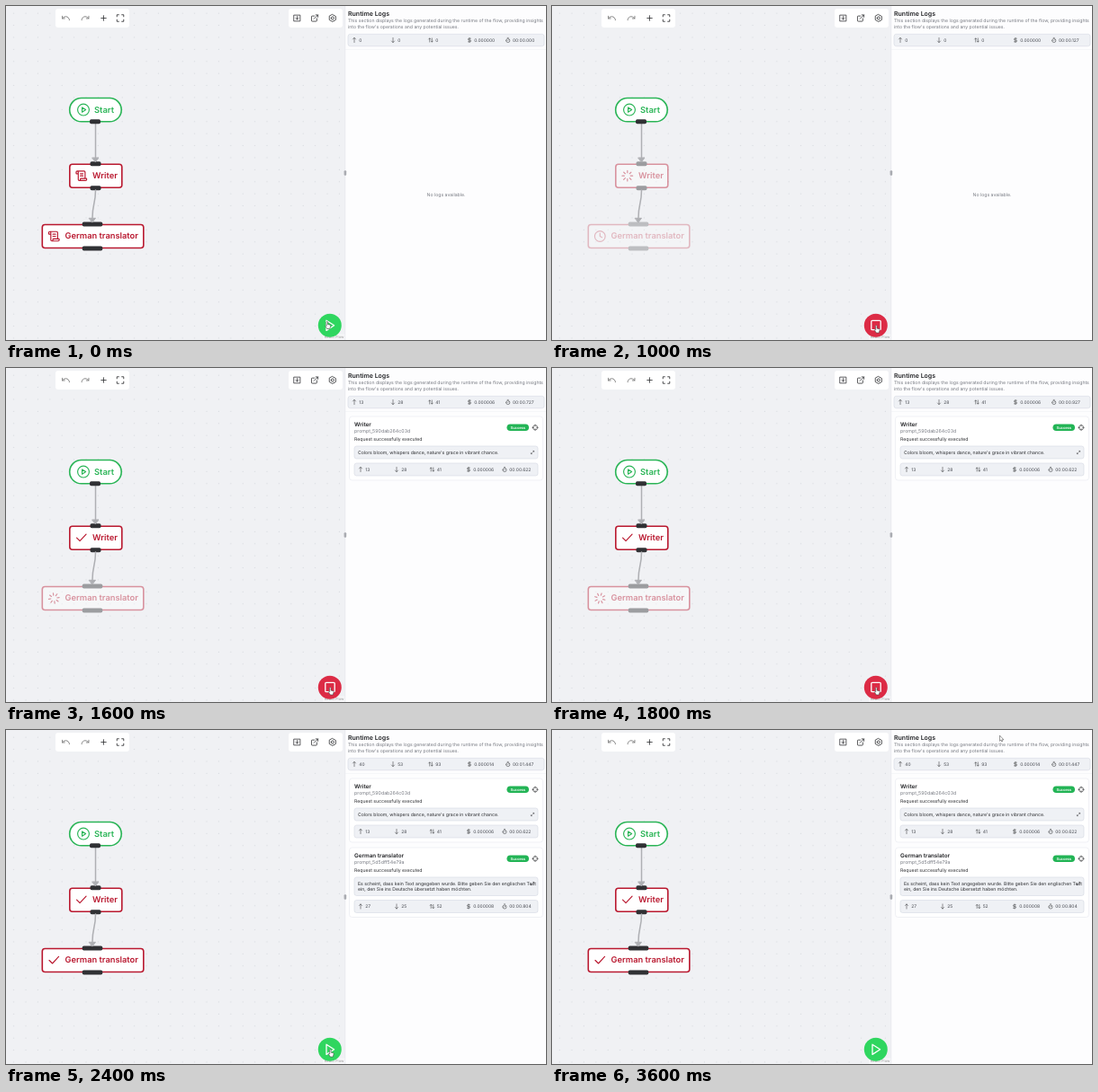
Write an HTML page that moves like this. It is 600x372 px and loops after 3700 ms.

```html
<!DOCTYPE html>
<html lang="en">
<head>
<meta charset="utf-8">
<title>Flow run</title>
<style>
  html, body { margin: 0; width: 100%; height: 100%; overflow: hidden; background: #f0f1f4; }
  svg { display: block; width: 100vw; height: 100vh; }
  text { font-family: Inter, Roboto, sans-serif; text-rendering: geometricPrecision; white-space: pre; }
</style>
</head>
<body>
<svg id="stage" viewBox="0 0 600 372"></svg>
<script>
const LOOP = 3700, STEP = 100;
const RUN = 873, WRITER_DONE = 1510, ALL_DONE = 2320;
const RED = '#b9182f', GREEN = '#2bb557', DARK = '#2c2d30', GREY = '#777a82';

const ICON = {
  undo: 'M3 7v6h6M21 17a9 9 0 0 0-9-9 9 9 0 0 0-6 2.3L3 13',
  redo: 'M21 7v6h-6M3 17a9 9 0 0 1 9-9 9 9 0 0 1 6 2.3l3 2.7',
  plus: 'M12 5v14M5 12h14',
  full: 'M8 3H3v5M16 3h5v5M3 16v5h5M21 16v5h-5',
  save: 'M3 3h18v18H3zM12 7v9M8 12l4 4 4-4',
  link: 'M15 3h6v6M10 14 21 3M18 13v6a2 2 0 0 1-2 2H5a2 2 0 0 1-2-2V8a2 2 0 0 1 2-2h6',
  gear: 'M12 2l9 5v10l-9 5-9-5V7zM8 12a4 4 0 1 0 8 0 4 4 0 1 0-8 0',
  up: 'M12 22V2M6 8l6-6 6 6',
  down: 'M12 2v20M6 16l6 6 6-6',
  both: 'M7 20V4M3 8l4-4 4 4M17 4v16M13 16l4 4 4-4',
  money: 'M12 2v20M17 5H9.5a3.5 3.5 0 0 0 0 7h5a3.5 3.5 0 0 1 0 7H6',
  watch: 'M10 2h4M12 14l3-3M4 14a8 8 0 1 0 16 0 8 8 0 1 0-16 0',
  target: 'M3 12a9 9 0 1 0 18 0 9 9 0 1 0-18 0M12 1v6M12 17v6M1 12h6M17 12h6',
  expand: 'M14 4h6v6M20 4l-6 6M10 20H4v-6M4 20l6-6',
  start: 'M1 12a11 11 0 1 0 22 0 11 11 0 1 0-22 0M9.5 7.5v9l7-4.5z',
  scroll: 'M15 12h-5M15 8h-5M19 17V5a2 2 0 0 0-2-2H4M8 21h12a2 2 0 0 0 2-2v-1a1 1 0 0 0-1-1H11a1 1 0 0 0-1 1v1a2 2 0 1 1-4 0V5a2 2 0 1 0-4 0v2a1 1 0 0 0 1 1h3',
  wait: 'M2 12a10 10 0 1 0 20 0 10 10 0 1 0-20 0M12 6v6l4 2',
  spin: 'M12 2v4M12 18v4M2 12h4M18 12h4M4.9 4.9l2.9 2.9M16.2 16.2l2.9 2.9M4.9 19.1l2.9-2.9M16.2 7.8l2.9-2.9',
  done: 'M3 12l6 6L21 5'
};

const rect = (x, y, w, h, r, fill, stroke = 'none', sw = 0.6) =>
  `<rect x="${x}" y="${y}" width="${w}" height="${h}" rx="${r}" fill="${fill}" stroke="${stroke}" stroke-width="${sw}"/>`;
const text = (s, x, y, size, fill = DARK, weight = 400, anchor = 'start') =>
  `<text x="${x}" y="${y}" font-size="${size}" fill="${fill}" font-weight="${weight}" text-anchor="${anchor}">${s}</text>`;
const path = (d, stroke, sw, fill = 'none') =>
  `<path d="${d}" stroke="${stroke}" stroke-width="${sw}" fill="${fill}" stroke-linecap="round" stroke-linejoin="round"/>`;
const icon = (name, x, y, size, color = DARK, turn = 0) =>
  `<g transform="translate(${x} ${y}) rotate(${turn}) scale(${size / 24}) translate(-12 -12)">${path(ICON[name], color, 2)}</g>`;

const handle = (x, y, w) => rect(x - w / 2, y - 2.5, w, 5, 1.7, '#303134');

function node(label, x, y, w, cx, hw, state, turn) {
  const alpha = { wait: 0.26, spin: 0.43 }[state] || 1;
  return `<g opacity="${alpha}">` + rect(x, y, w, 26, 3, '#fff', RED, 1.6) +
    handle(cx, y - 0.5, hw) + handle(cx, y + 26.5, hw) +
    icon(state, x + 13, y + 13, 14, RED, state === 'spin' ? turn : 0) +
    text(label, x + 25.3, y + 15.4, 9.3, RED, 600) + '</g>';
}

function stats(x, y, w, h, xs, values) {
  const names = ['up', 'down', 'both', 'money', 'watch'];
  return rect(x, y, w, h, 2.5, '#eff1f5', '#d5d9e2') +
    names.map((n, i) => icon(n, xs[i], y + h / 2, 6.2) +
      text(values[i], xs[i] + 5.2, y + h / 2 + 1.8, 4.95, '#44474e')).join('');
}

function card(y, title, id, lines, values) {
  const h = 7.5 + 6.5 * lines.length, low = y + 33 + h + 5;
  return rect(381.5, y, 215, h + 57, 3, '#fff', '#e6e8ee') +
    text(title, 387, y + 11, 6.3, '#202124', 600) +
    text(id, 387, y + 18, 5.3, GREY) +
    text('Request successfully executed', 387, y + 27, 5.15) +
    rect(556.5, y + 8.5, 24.5, 7.6, 3.8, '#22b455') +
    text('Success', 568.8, y + 13.8, 4, '#fff', 600, 'middle') +
    icon('target', 588, y + 12.3, 7) +
    rect(387, y + 33, 204, h, 2.5, '#eff1f5', '#d5d9e2') +
    lines.map((s, i) => text(s, 391, y + 41.7 + i * 6.5, 5.15)).join('') +
    icon('expand', 585, y + 40, 5) +
    stats(387, low, 204, 14, [394, 434, 473.5, 514, 554], values);
}

const clock = ms => '00:0' + Math.floor(ms / 1000) + '.' + String(ms % 1000).padStart(3, '0');
const ease = u => u * u * (3 - 2 * u);
const mix = (a, b, t, from, to) => a + (b - a) * ease(Math.min(1, Math.max(0, (t - from) / (to - from))));

function cursor(t) {
  if (t < 2900) {
    const x = mix(356, 359.5, t, 0, 300), y = mix(351, 355.5, t, 0, 300);
    return `<g transform="translate(${x} ${y})">` +
      path('M0 .8Q.8-.6 1.5.8V3.6L4.2 4.2Q4.8 4.5 4.6 5.4L3.8 8.5H.8L-1.2 5.4Q-1 4.4 0 5.1Z', '#444', 0.6, '#fff') + '</g>';
  }
  const x = mix(363, 497.5, t, 3200, 3600), y = mix(338, 6.5, t, 3200, 3600);
  return `<g transform="translate(${x} ${y})">` +
    path('M0 0V5.8L1.3 4.6L2.2 6.5L3.1 6.1L2.3 4.3H4Z', '#555', 0.6, '#fff') + '</g>';
}

function flow(t, running) {
  const turn = t * 0.36;
  const writer = t < RUN ? 'scroll' : t < WRITER_DONE ? 'spin' : 'done';
  const german = t < RUN ? 'scroll' : t < WRITER_DONE ? 'wait' : t < ALL_DONE ? 'spin' : 'done';
  const edge = '#aeafb3';
  return '<defs><pattern id="dots" x="1.5" y="1" width="13.4" height="13.4" patternUnits="userSpaceOnUse">' +
    '<circle cx="7" cy="7" r=".55" fill="#cfd1d7"/></pattern></defs>' +
    rect(0, 0, 377, 372, 0, '#f0f1f4') + rect(0, 0, 377, 372, 0, 'url(#dots)') +
    rect(55, 3, 82, 21, 3, '#fff') + rect(314, 3, 60, 21, 3, '#fff') +
    icon('undo', 66.5, 13.5, 10.5, '#777') + icon('redo', 88, 13.5, 10.5, '#777') +
    icon('plus', 108.5, 13.5, 9.5) + icon('full', 127, 13.5, 10) +
    icon('save', 323.5, 13.5, 9) + icon('link', 343, 13.5, 9.5) + icon('gear', 362.8, 13.5, 9.5) +
    rect(70.7, 102.5, 57.5, 26.3, 13.1, '#fff', GREEN, 1.6) +
    icon('start', 86, 115.6, 14, GREEN) + text('Start', 98, 119, 9.4, GREEN, 600) +
    node('Writer', 70.8, 176.2, 58, 99.5, 12, writer, turn) +
    node('German translator', 40.3, 243.5, 112.5, 96, 22.5, german, turn) +
    path('M99.5 131V169', edge, 1.5) + path('M96 169h7l-3.5 4.5z', edge, 1, edge) +
    path('M99.5 205C99.5 221 96 220 96 236', edge, 1.5) + path('M92.5 236.3h7l-3.5 4.5z', edge, 1, edge) +
    handle(99, 128.8, 12) +
    rect(352, 365.5, 25, 6.5, 0, '#f7f7f9') + text('React Flow', 375.5, 369.7, 4.2, '#999', 400, 'end') +
    `<circle cx="359.8" cy="355.7" r="13" fill="${running ? '#dc2b45' : '#2fd65f'}"/>` +
    (running ? rect(354.8, 350.3, 10.4, 10.4, 1, 'none', '#fff', 1.3)
             : path('M356 350.2V361.4L364.6 355.8Z', '#fff', 1.3));
}

function logs(t) {
  const total = t < WRITER_DONE ? [0, 0, 0, '0.000000'] : t < ALL_DONE ? [13, 28, 41, '0.000006'] : [40, 53, 93, '0.000014'];
  const time = clock(Math.min(1447, Math.max(0, t - RUN)));
  let out = rect(377, 0, 223, 372, 0, '#fdfdfe') + rect(376.6, 0, 0.6, 372, 0, '#e4e6eb') +
    rect(375.6, 183.2, 2.6, 5.6, 1, '#a9abb1') +
    text('Runtime Logs', 380, 10.6, 7, '#202124', 600) +
    text('This section displays the logs generated during the runtime of the flow, providing insights', 380, 18, 5.15, GREY) +
    text("into the flow's operations and any potential issues.", 380, 24.6, 5.15, GREY) +
    stats(380, 31.3, 218, 13.4, [387, 430, 472, 515, 557.7], [...total, time]) +
    rect(377, 48, 223, 0.5, 0, '#eceef2');
  if (t < WRITER_DONE) return out + text('No logs available.', 489, 212, 5.15, GREY, 400, 'middle');
  out += card(54, 'Writer', 'prompt_590dab264c03d',
    ["Colors bloom, whispers dance, nature's grace in vibrant chance."],
    [13, 28, 41, '0.000006', '00:00.622']);
  if (t >= ALL_DONE) out += card(131, 'German translator', 'prompt_5d5dff54e79a',
    ['Es scheint, dass kein Text angegeben wurde. Bitte geben Sie den englischen Text',
     'ein, den Sie ins Deutsche übersetzt haben möchten.'],
    [27, 25, 52, '0.000008', '00:00.804']);
  return out;
}

const stage = document.getElementById('stage');
let shown = -1;
function frame() {
  const t = Math.floor(performance.now() % LOOP / STEP) * STEP;
  if (t !== shown) {
    shown = t;
    stage.innerHTML = flow(t, t >= RUN && t < ALL_DONE) + logs(t) + cursor(t);
  }
  requestAnimationFrame(frame);
}
frame();
</script>
</body>
</html>
```
